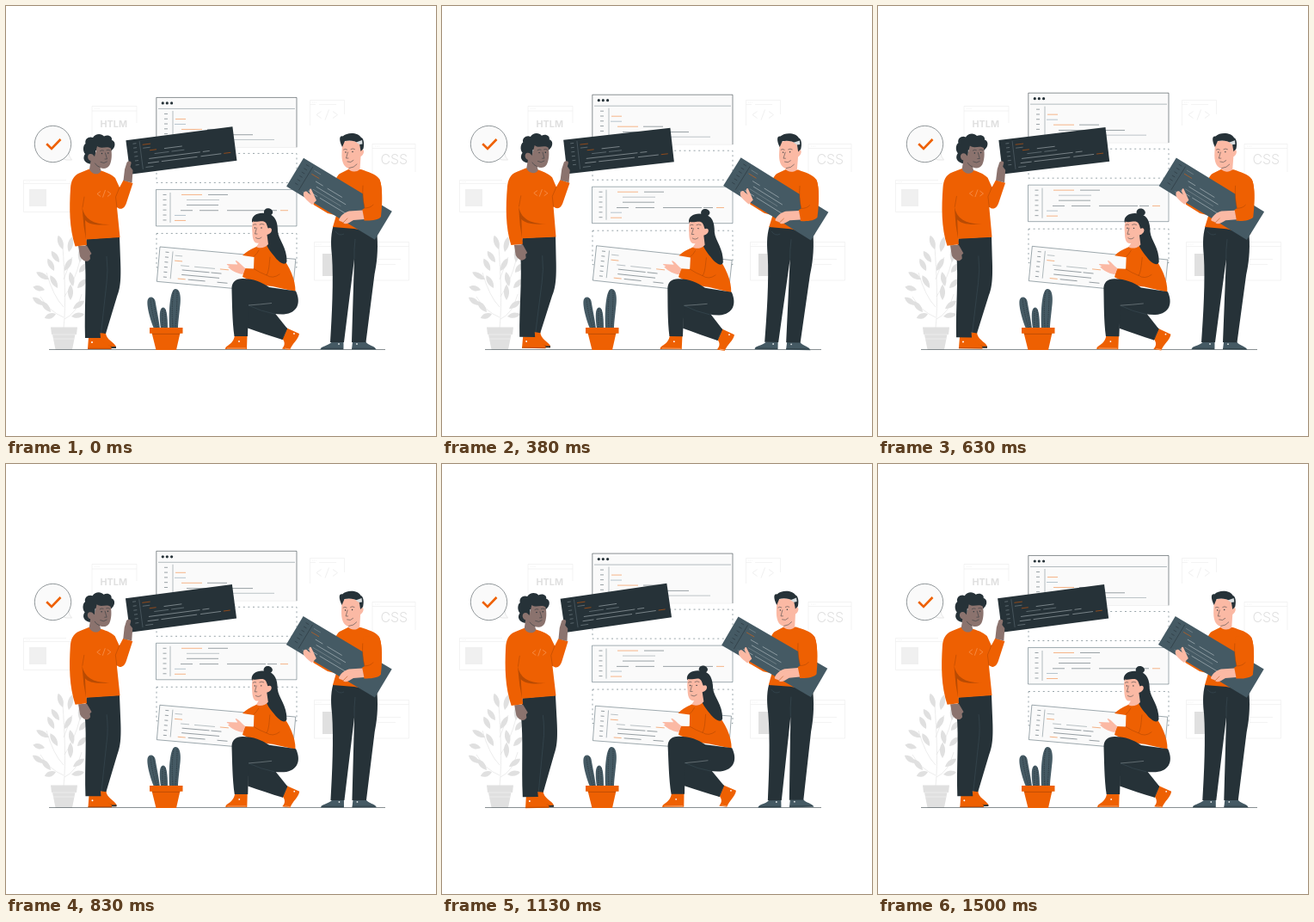
Recreate the animation shown at these times as an HTML page. Size 500 px wide and 500 px high, loop 1540 ms.

```html
<!DOCTYPE html>
<html lang="en">
<head>
<meta charset="utf-8">
<title>Code blocks</title>
<style>
  html, body { margin: 0; width: 100%; height: 100%; overflow: hidden; background: #fff; }
  svg { display: block; width: 100vw; height: 100vh; }
  .o { fill: #ee6002; } .k { fill: #263238; } .s { fill: #455a64; }
  .shade { fill: #b94b03; }
  .brown { fill: #8b736e; } .skin { fill: #fbb9a4; }
  .bg { fill: none; stroke: #ebebeb; stroke-width: .6; }
  .soft { fill: #f0f0f0; }
  .pane { fill: #fafafa; stroke: #455a64; stroke-width: .5; }
  .dash { fill: none; stroke: #455a64; stroke-width: .55; stroke-dasharray: 2 3.6; }
  .ln { fill: none; stroke: #263238; stroke-width: .5; stroke-linecap: round; stroke-linejoin: round; }
  .thin { fill: none; stroke: #455a64; stroke-width: .4; }
  .fold { fill: none; stroke: #a84402; stroke-width: .5; stroke-linecap: round; }
  .txt { font-family: Inter, Roboto, sans-serif; fill: #e0e0e0; }
</style>
</head>
<body>
<svg viewBox="0 0 500 500" xmlns="http://www.w3.org/2000/svg">
  <!-- background windows -->
  <path class="bg" d="M100 150V116.500H152V136M100 122H152M103 119.300h1.200m1 0h1.200m1 0h1.200"/>
  <text class="txt" x="109.500" y="141" font-size="10.800" font-weight="700">HTLM</text>
  <path class="bg" d="M353.500 139V109.500H393.500V126M353.500 114.500H360M364 114.500H384M356 112h1m1 0h1m1 0h1"/>
  <path class="bg" style="stroke-width:.8" d="M366.500 122.500L361 126.500L366.500 130.500M375.500 120.500L371 132.500M380 122.500L385.500 126.500L380 130.500"/>
  <path class="bg" d="M426 194V160.500H476V193M426 165.500H476M429 163h1.200m1 0h1.200m1 0h1.200"/>
  <text class="txt" x="435.500" y="184" font-size="15.900" font-weight="300">CSS</text>
  <path class="bg" d="M70 202.500H20.500V239.500H75M20.500 206.500H75M23 204.500h1m1 0h1m1 0h1"/>
  <path class="soft" d="M27 213h20v20h-20z"/>
  <path class="bg" d="M358.500 274.500H468.500V319H358.500zM358.500 279.500H468.500M361 277h1.200m1 0h1.200m1 0h1.200M432 294.500H459M432 300.500H453"/>
  <path d="M368 288h24v26h-24z" fill="#e0e0e0"/>

  <g id="plant" fill="#e0e0e0">
    <path d="M67 375C70 345 68 310 66 280M67 350Q55 338 47 310M68 338Q80 320 86 296M67 362Q50 355 40 338M68 364Q82 358 88 335M67 318Q72 305 77 292" fill="none" stroke="#e0e0e0" stroke-width=".6"/>
    <path d="M52 373.500H83L82 382H80.500L77 399.500H57.500L54 382H53Z"/>
    <path d="M53.500 382H81.500M55 387H80" stroke="#f2f2f2" stroke-width=".6"/>
  </g>

  <!-- bubble -->
  <path d="M63 176Q70 180.500 76.500 179Q73 176 73 169" fill="#fafafa" stroke="#d5d5d5" stroke-width=".5"/>
  <circle cx="54.500" cy="160.500" r="21.200" fill="#fafafa" stroke="#263238" stroke-width=".5"/>
  <path d="M47.200 160.300L53 166L63.500 155" fill="none" stroke="#ee6002" stroke-width="2.600"/>

  <path d="M50 399.500H441" stroke="#263238" stroke-width=".55"/>

  <!-- stacked panes -->
  <g id="panes">
    <path class="dash" d="M175 171.500H338V205.500H175zM175 264.500H338V304H175z"/>
    <path d="M175 106.500H338V164.500H175z" fill="#fafafa" stroke="#dedede" stroke-width=".4"/>
    <path class="ln" d="M174.800 164V106.500H338V164"/>
    <path class="thin" d="M177 119.500H336M194 122V164"/>
    <g class="k"><circle cx="182.300" cy="113" r="1.600"/><circle cx="187.300" cy="113" r="1.600"/><circle cx="192.600" cy="113" r="1.600"/></g>
    <path class="pane" d="M174.500 213.500H338V256H174.500z"/>
    <path class="thin" d="M191 217V252"/>
    <g id="code1"></g>
  </g>

  <!-- cactus -->
  <g class="s">
    <path d="M172 375C166 360 163 345 165 341C167 337 172 338 173.500 343C175 352 178 366 179 375Z"/>
    <path d="M180 375C178 362 178 351 182.500 350.500C187 350 188 362 188 375Z"/>
    <path d="M190 375C189 352 191 330 196.500 329C203 328 204 340 202 352C201 362 200 369 200 375Z"/>
  </g>
  <path d="M168 341Q170 358 175 374M171 340Q173 355 177 374M182 352V374M185 353V374M195 331Q192 350 194 374M199 331Q199 352 197 374" fill="none" stroke="#263238" stroke-width=".7" stroke-dasharray="1.500 1"/>
  <path class="o" d="M169.500 380H202.500L198 400H174.500Z"/>
  <path class="shade" d="M169.700 380.500H202.300L202.100 381.700H170Z"/>
  <path class="o" d="M167 374H205.500V380.700H167Z"/>

  <!-- crouching woman -->
  <g id="woman">
    <g transform="translate(179 280) rotate(5.200)">
      <path class="pane" d="M0 0H158.500V40.500H0z"/>
      <path class="thin" d="M15.500 4V36"/>
      <g id="code2"></g>
    </g>
    <path class="o" d="M325.500 374L341 381C340 388 333 392 330 400L321 398.500C326 393 323 389 321 386Z"/>
    <path class="k" d="M280 346L313 357.500L327 375L321.500 388L281 362.500Z"/>
    <path class="k" d="M300 356L327 375L321.500 388C308 384 294 379 281 374.500V350Z"/>
    <path class="o" d="M266 383H280.500L280 399H255C255 394 264 395 266 383Z"/>
    <path class="o" d="M300 275L290 280.500C284 283 279 286 275 290L288.500 292L288 305.500L277.500 305L275 315C285 320 298 325 310 326L336.500 332C337 318 329 302 321 292L311 280Z"/>
    <path class="k" d="M262.500 330C262 321 267 317 275 317C288 317 297 321 306 327L337 331.500C343 344 340 357 323 358.500C307 359 293 353 282 348L281 384H265.500C263 366 263 346 262.500 330Z"/>
    <path class="thin" style="stroke:#b9c2c6" d="M282 348Q296 347 309 345.500"/>
    <path class="thin" d="M282 348Q296 355 312 358M326 377L322 386"/>
    <path d="M257 398H279M324 398L330 399" stroke="#fff" stroke-width=".4"/>
    <circle cx="271" cy="390" r=".9" fill="#fff"/><circle cx="335" cy="381" r=".9" fill="#fff"/>
    <path class="fold" d="M307 292C306 300 306 308 303 313Q295 310 288 305.500M303 313Q310 318 318 312M288.500 291Q292 288 294 284"/>
    <path class="skin" d="M278.500 305C274 302 270 296 267 296C266 297 270 300 269 300.500L257 300C255.500 301 263 303 258 303C260 306 267 311 275.500 312Z"/>
    <path class="k" d="M286 251C285 243 294 239 304 241.500C313 243 316 251 316 262C317 272 327 281 326.500 297C325 303 317 298 312 291C306 284 300 276 299 262Z"/>
    <path class="k" d="M300 241C299 235 306 233.500 309 237C312 240 309 244 305 244Z"/>
    <path class="skin" d="M287 250.500C293 252 299 248 302 252C304 255 304 258 305 258.500C309 256 311 262 306 265L303.500 266L305 277C301 282 294 282 291 280L294 275.500C288 277 286.500 270 286.500 264C286 259 286 254 287 250.500Z"/>
    <path class="ln" d="M287.500 254.500Q289 253 291 254M295 254Q297.500 252.500 300 254M291.500 258L289.500 265H292M290.500 269.500Q294 272 297 269"/>
    <g class="k"><circle cx="289.500" cy="258" r=".7"/><circle cx="297" cy="258" r=".7"/></g>
  </g>

  <!-- man on the left -->
  <g id="left">
    <path class="o" d="M108.500 380L116 379.500C116 388 126 391 128 396V398H111Z"/>
    <path class="k" d="M112 396.800L128 396V398H112Z"/>
    <path class="fold" d="M111 391Q116 395 123 396"/>
    <path class="o" d="M96 385.500H110.500C110 392 120 393 122.500 397V399H95Z"/>
    <path d="M95 398.300H122.500" stroke="#a84402" stroke-width=".7"/><circle cx="100" cy="391" r="1" fill="#fff"/>
    <path class="k" d="M93.500 271L132 268.500L133 295C134 318 133 328 129 338L116 381L109.500 380L110 386H92C91 350 94 320 91.500 290Z"/>
    <path class="thin" d="M117 291Q119 308 117 322L110.500 381"/>
    <path class="brown" d="M84 279L94 278.500L99.500 288L97.500 290L98 294C95 299 89 297 86 291Z"/>
    <path class="o" d="M97 189.500L86 194C78 197 75.500 204 75 212C73.500 235 73.500 258 80.500 279.500L94 278L93.500 271.500L132.500 269L129 234C134 238 138 235 140 229L147.500 206L136.500 202.500L132 211L127 200C122 195 115 193 109 191C106 196 100 194 97 189.500Z"/>
    <path class="shade" d="M88.500 234C91 248 102 254.500 121 254C106 255.500 96 254 92 249L93 271L90.500 256Z"/>
    <path class="fold" d="M132 211L127.500 222L129 234M91 222L89 234"/>
    <path d="M110 215.500L106 218.500L110 221.500M115.500 214L112.500 222.500M118 215.500L122 218.500L118 221.500" fill="none" stroke="#ffb07c" stroke-width=".5"/>
    <g transform="translate(139.400 156.200) rotate(-7.300)">
      <path class="k" d="M0 0H125V39.800H0z"/>
      <path d="M15.500 3V36" stroke="#71818a" stroke-width=".4"/>
      <g id="code3"></g>
    </g>
    <path class="brown" d="M136.500 203L138 190L140.500 182C142 180 146 180 145.500 183L144.500 187L147.500 191L146.500 205.500Z"/>
    <path class="k" d="M97 183.500C91 182 88.500 177 92 172C88.500 168 90 161 92.500 160C91 154 97 151 101 153C104 148 111 148 114 151.500C119 149 124 152 123 156C127 157 127.500 162 125 165.500L121 170L104 168V184Z"/>
    <path class="brown" d="M106 163C111 167 117 162 122 165.500C123.500 172 123 180 120.500 185C118 189.500 113 189.500 109.500 188L110.500 192C107 198 99 195 97 190L98.500 180C94.500 179 94 173 97.500 172C101 171.500 102 174 103 175Z"/>
    <path class="ln" d="M109.500 168.500Q111.500 167 113.500 168M117 167.500Q119 166.500 121 168M115.500 171L117.500 178H115M110 181.500Q114 184 117.500 181M109 187.500Q105 186 103.500 183"/>
    <g class="k"><circle cx="111.500" cy="171.500" r=".7"/><circle cx="118.800" cy="171" r=".7"/></g>
  </g>

  <!-- man on the right -->
  <g id="right">
    <path class="s" d="M379 390.500H392.500V399.500H365.500C366 395 374 396 379 390.500ZM403 390.500L418 390C421 395 429 395 430.500 399.500H402Z"/>
    <path d="M367 398.300H392M402 398.300H429" stroke="#263238" stroke-width=".6"/>
    <circle cx="387" cy="393" r=".9" fill="#dfe4e6"/><circle cx="408" cy="393" r=".9" fill="#dfe4e6"/>
    <path class="k" d="M380.500 256L405 256L431.500 266C433 285 431 300 428.500 312L418.500 391H402L405 294L393 391H377C379 360 381 320 379 290C378 280 377 268 380.500 256Z"/>
    <path class="thin" d="M406 271Q404.500 284 405 294M383 262Q387 268 393 265"/>
    <path class="o" d="M398 190L388 195C384 198 382 205 381 212L358 225L357.500 231L374 241L384 243.500L380 257L405 259L433 265L436 236C438 220 437 207 434 201C430 195 421 193 413 190Z"/>
    <g transform="translate(346 176.800) rotate(31.050)">
      <path class="s" d="M0 0H120V38.600H0z"/>
      <path d="M14.500 3V35" stroke="#263238" stroke-width=".5"/>
      <g id="code4"></g>
    </g>
    <path class="o" d="M416 200C414 212 415 224 417 235L414 237L416.500 249.500C424 250 433 249 436 245C438 230 438 208 434 201Z"/>
    <path class="fold" d="M417 235Q424 235 427 231M417 234Q414 223 415 209"/>
    <path class="skin" d="M414.500 237.500L399 238.500C393 240 388 245 387 249C388 251 391 250 392 252C395 255 399 252 404 249L416.500 248Z"/>
    <path class="fold" d="M392 252L397 247"/>
    <path class="skin" d="M356 231C352 228 346 223 346 220C345 216 349 214 351 217L355 220C351 216 353 211 355 213L361 226Z"/>
    <path class="skin" d="M391 159C397 155 406 156 411.500 160L412.500 167C417 165 417.500 172 412.500 175L411.500 190C407 194 400 193 397.500 188.500C392 186 390 180 390.500 170Z"/>
    <path class="k" d="M391 164C386.500 155 388 150.500 391.500 151.500C397 146 410 147 413 153C416 154 417 160 415.500 166L412.500 169L411 160C405 156 399 156 394 157Z"/>
    <path d="M407 158.500L414 156L414.500 160.500L411 161Z" fill="#d7dcde"/>
    <path class="ln" d="M392.500 167Q394 165.500 396.500 167M401 166.500Q403 165 405.500 166.500M397.500 170L395.500 177H398M397 181Q401 183 404 179.500M399 188.500Q405 188 408 184"/>
    <g class="k"><circle cx="395" cy="170" r=".7"/><circle cx="403" cy="169.500" r=".7"/></g>
  </g>
</svg>
<script>
const $ = id => document.getElementById(id);
const LOOP = 1540;

// Code rows: [colour, y, from, to, from, to, ...]
function code(id, colours, rows) {
  $(id).innerHTML = rows.map(([c, y, ...x]) => {
    let d = '';
    for (let i = 0; i < x.length; i += 2) d += `M${x[i]} ${y}H${x[i + 1]}`;
    return `<path d="${d}" stroke="${colours[c]}" stroke-width=".5"/>`;
  }).join('');
}
const ticks = (y, step, n, x) =>
  Array.from({ length: n }, (_, i) => ['t', y + i * step, x, x + 4]);

const onLight = { o: '#ee6c14', d: '#37474f', g: '#7d8b92', b: '#6f8a9c', t: '#37474f' };
const onDark = { o: '#ee6002', d: '#c3ccd0', g: '#8b989e', t: '#8b989e' };

code('code1', onLight, [
  ...ticks(125.5, 5.8, 5, 184), ...ticks(219.5, 5.9, 6, 182.5),
  ['o', 131.5, 197, 209], ['b', 137.5, 196, 209],
  ['o', 143.5, 204, 228], ['d', 143.5, 234, 257],
  ['d', 149.8, 210, 287], ['g', 155.5, 205, 312],
  ['o', 219.5, 204, 228], ['d', 219.5, 235, 258],
  ['g', 225.5, 210, 248], ['d', 231.5, 210, 247],
  ['d', 237.8, 203, 217, 225, 247, 257, 302, 304, 315], ['o', 237.8, 319, 328],
  ['b', 243.5, 196, 209], ['o', 249.5, 196, 209]
]);
code('code2', onLight, [
  ...ticks(5.5, 5.8, 6, 7),
  ['g', 8.5, 18.5, 27], ['o', 14.5, 18.5, 27.5],
  ['g', 19.5, 26, 36, 42, 66], ['o', 19.5, 72, 82],
  ['d', 24.5, 28, 60, 62, 74], ['d', 30, 28, 72],
  ['o', 35, 24, 33], ['d', 35, 36, 56, 70, 82]
]);
code('code3', onDark, [
  ...ticks(5, 5, 6, 7.5),
  ['o', 7.5, 18.5, 28], ['g', 11.5, 18.5, 27], ['o', 15, 26, 34], ['d', 15, 43, 64],
  ['g', 19.5, 31, 48, 51, 66], ['d', 24.5, 24, 84, 87, 95],
  ['d', 29.5, 22, 35, 38, 80, 84, 108], ['o', 29.5, 111, 119], ['g', 34, 19, 28]
]);
code('code4', { ...onDark, t: '#263238' }, [
  ...ticks(5, 5, 6, 6.5),
  ['g', 6, 18, 27], ['o', 11, 17.5, 28], ['d', 16, 26, 36, 42, 62],
  ['d', 21, 30, 70], ['g', 25.5, 28, 66],
  ['d', 30, 24, 37, 40, 78], ['g', 34, 19, 28]
]);

// Plant leaves: x, y, angle, length
const leaves = [
  66, 283, -18, 17, 73, 286, 12, 18, 62, 298, -35, 16, 86, 298, 5, 19,
  56, 308, -28, 16, 68, 308, 30, 17, 50, 318, -60, 17, 60, 328, -30, 17,
  85, 310, 40, 14, 78, 326, -12, 17, 45, 330, -75, 14, 83, 328, 45, 15,
  75, 342, 0, 18, 44, 348, -55, 16, 52, 356, -40, 17, 78, 352, 55, 16, 58, 358, -110, 14, 76, 361, 80, 15
];
for (let i = 0; i < leaves.length; i += 4) {
  const [x, y, a, n] = leaves.slice(i, i + 4);
  $('plant').insertAdjacentHTML('beforeend',
    `<path transform="translate(${x} ${y}) rotate(${a})" d="M0 0C-5 ${-n * .4} -3 ${-n * .8} 0 ${-n}C3 ${-n * .8} 5 ${-n * .4} 0 0"/>`);
}

const sway = (id, angle, x, y) => $(id).setAttribute('transform', `rotate(${angle} ${x} ${y})`);

function draw(ms) {
  const p = (ms % LOOP) / LOOP * 2 * Math.PI;
  const tilt = 0.9 * Math.sin(p);
  sway('left', tilt, 170, 270);
  sway('woman', tilt, 258, 318);
  sway('right', tilt, 387, 274);
  $('panes').setAttribute('transform', `translate(0 ${-2.75 * (1 - Math.cos(p + 0.22))})`);
}

const start = performance.now();
function tick() {
  draw(performance.now() - start);
  requestAnimationFrame(tick);
}
draw(0);
requestAnimationFrame(tick);
</script>
</body>
</html>
```
